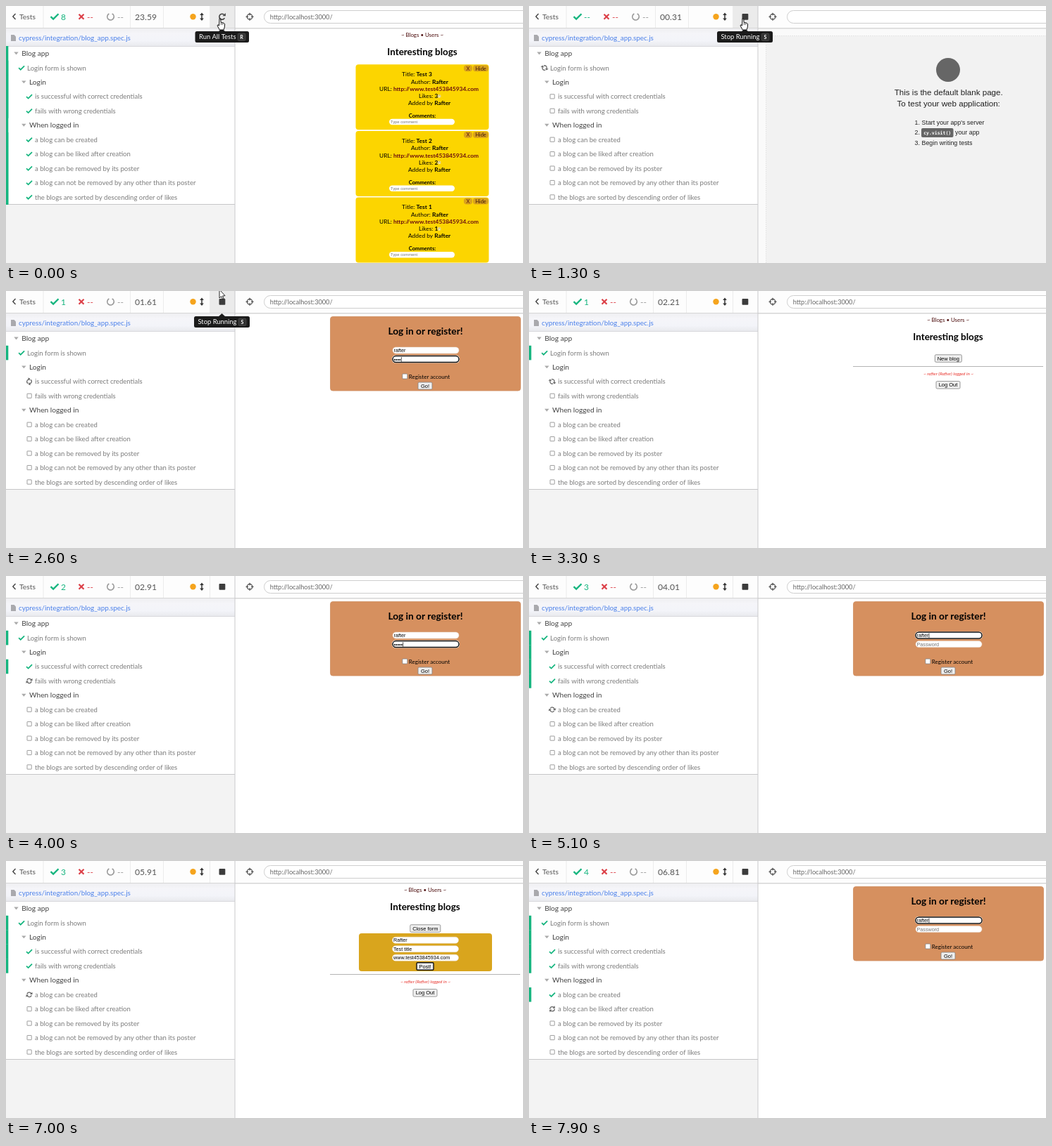
An HTML page with a canvas for the animation above (8000 ms loop, 734 by 366 pixels).

```html
<!DOCTYPE html>
<html lang="en">
<head>
<meta charset="utf-8">
<title>Test runner</title>
<style>
html, body { margin: 0; width: 100%; height: 100%; overflow: hidden; background: #fff; }
canvas { display: block; width: 734px; height: 366px; }
</style>
</head>
<body>
<canvas id="stage" width="734" height="366"></canvas>
<script>
const ctx = document.getElementById('stage').getContext('2d');
const LOOP = 8000, STEP = 100;
const UI = 'Lato, sans-serif', ARIAL = '"Liberation Sans", Arial, sans-serif';
const GREEN = '#16b57f', RED = '#dc4048', GREY = '#7c7c7c';
const USER = 'rafter', AUTHOR = 'Rafter', SITE = 'www.test453845934.com';

const rows = [
  ['Blog app', 0], ['Login form is shown', 1, 0], ['Login', 1],
  ['is successful with correct credentials', 2, 1], ['fails with wrong credentials', 2, 2],
  ['When logged in', 1], ['a blog can be created', 2, 3],
  ['a blog can be liked after creation', 2, 4], ['a blog can be removed by its poster', 2, 5],
  ['a blog can not be removed by any other than its poster', 2, 6],
  ['the blogs are sorted by descending order of likes', 2, 7]
];
const testEnds = [1800, 3400, 4300, 7200];
const rowY = i => 67.6 + 20.45 * i;

// ---- drawing helpers ----
function rect(x, y, w, h, color) {
  ctx.fillStyle = color;
  ctx.fillRect(x, y, w, h);
}
function round(x, y, w, h, r, fill, stroke, lw = 1) {
  ctx.beginPath();
  ctx.roundRect(x, y, w, h, r);
  if (fill) { ctx.fillStyle = fill; ctx.fill(); }
  if (stroke) { ctx.strokeStyle = stroke; ctx.lineWidth = lw; ctx.stroke(); }
}
function path(points, color, lw = 1, fill) {
  ctx.beginPath();
  points.forEach(([x, y]) => ctx.lineTo(x, y));
  if (fill) { ctx.closePath(); ctx.fillStyle = fill; ctx.fill(); }
  if (color) { ctx.strokeStyle = color; ctx.lineWidth = lw; ctx.stroke(); }
}
function disc(x, y, r, color) {
  ctx.beginPath();
  ctx.arc(x, y, r, 0, 7);
  ctx.fillStyle = color;
  ctx.fill();
}
function arc(x, y, r, from, to, color, lw) {
  ctx.beginPath();
  ctx.arc(x, y, r, from, to);
  ctx.strokeStyle = color;
  ctx.lineWidth = lw;
  ctx.stroke();
}
// y is the middle of the line; returns the x after the text
function text(s, x, y, size, color = '#000', { font = UI, style = '', align = 'left' } = {}) {
  ctx.font = `${style} ${size}px ${font}`;
  ctx.textAlign = align;
  ctx.fillStyle = color;
  ctx.fillText(s, x, y + size * 0.35);
  return x + ctx.measureText(s).width;
}
const center = (s, x, y, size, color, opt) => text(s, x, y, size, color, { ...opt, align: 'center' });

function check(x, y, s) {
  path([[x - 5 * s, y + .2 * s], [x - 1.7 * s, y + 3.3 * s], [x + 5 * s, y - 3.4 * s]], GREEN, 2.2 * s);
}
function spinner(x, y, t) {
  ctx.save();
  ctx.translate(x, y);
  ctx.rotate(t / 2000 * Math.PI * 2);
  for (let i = 0; i < 2; i++) {
    arc(0, 0, 3.2, .25, 2.75, '#666', 1.3);
    path([[-4.5, .2], [-.9, .2], [-4.5, 3.6]], null, 1, '#666');
    ctx.rotate(Math.PI);
  }
  ctx.restore();
}
function button(s, x, y, w, h, focus) {
  round(x - w / 2, y - h / 2, w, h, 1.5, '#efefef', focus ? '#111' : '#808080', focus ? 1.4 : .8);
  center(s, x, y, 7.5, '#000', { font: ARIAL });
}
function field(x, y, w, value, hint, focus) {
  if (focus) round(x - 1, y - 1, w + 2, 11, 5, '#fff');
  round(x, y, w, 9, 4.5, '#fff', focus ? '#111' : '#e4d9cd', focus ? 1.5 : .5);
  const end = text(value || hint, x + 1.5, y + 4.6, 7.2, value ? '#000' : '#757575', { font: ARIAL });
  if (focus) rect(value ? end + .3 : x + 1.5, y + 1.5, .7, 6.5, '#000');
}

// ---- pages under test ----
function blogCard(n, y) {
  round(496.5, y, 189, 93, 4, '#fcd500');
  round(650, y + 1, 12, 9, 4, '#d9a21c');
  round(663, y + 1, 22, 9, 4, '#d9a21c');
  center('X', 656, y + 5.7, 7.5, '#5b1a10');
  center('Hide', 674, y + 5.7, 7.5, '#3c160c');
  const line = (label, value, x, dy, color) =>
    text(value, text(label + ' ', x, y + dy, 8.4), y + dy, 8.4, color, { style: 'bold' });
  line('Title:', 'Test ' + n, 562, 14);
  line('Author:', AUTHOR, 575, 24.3);
  line('URL:', 'http://' + SITE, 530, 34.8, '#6b0f0f');
  line('Likes:', n, 586, 45);
  disc(615, y + 45, 2.4, '#f3e6a4');
  path([[613, y + 47], [615, y + 43], [617, y + 45.5]], '#b9a66a', .7);
  line('Added by', AUTHOR, 571, 55);
  center('Comments:', 591, y + 73, 7.6, '#000', { style: 'bold' });
  round(544, y + 77.5, 93, 8.5, 4.2, '#fff');
  text('Type comment', 546, y + 81.8, 5.8, '#777', { font: ARIAL });
}
function pageHead(x) {
  center('~ Blogs • Users ~', x, 41.3, 7.9, '#4a0a0a');
  center('Interesting blogs', x, 65.3, 13.4, '#000', { style: 'bold' });
}
function blogsPage() {
  pageHead(591);
  [3, 2, 1].forEach((n, i) => blogCard(n, 83.3 + 94.6 * i));
}
function blankPage() {
  rect(326, 33, 408, 333, '#fafafa');
  rect(337, 43, 397, 323, '#f2f2f2');
  ctx.setLineDash([2, 1]);
  path([[336.5, 366], [336.5, 42.5], [734, 42.5]], '#e4e4e4');
  ctx.setLineDash([]);
  disc(595, 91, 17, '#666');
  const opt = { font: ARIAL };
  center('This is the default blank page.', 595.7, 123.3, 11.6, '#222', opt);
  center('To test your web application:', 595.7, 139.3, 11.6, '#222', opt);
  ['1.', '2.', '3.'].forEach((s, i) => text(s, 547.5, 165.5 + 14.6 * i, 8.8, '#222', opt));
  text("Start your app's server", 557.5, 165.5, 8.9, '#222', opt);
  round(557, 174, 45.5, 13, 2, '#666');
  center('cy.visit()', 579.7, 180.5, 6.5, '#fff', { font: '"DejaVu Sans Mono", monospace', style: 'bold' });
  text('your app', 605, 180.3, 8.9, '#222', opt);
  text('Begin writing tests', 557.5, 194.8, 8.9, '#222', opt);
}
function loginPage(user = '', dots = 0, focus = user ? 0 : -1) {
  round(460.5, 36.5, 270, 105.5, 3.5, '#d6905f', '#cf8d60', .8);
  center('Log in or register!', 595.5, 57, 13.7, '#000', { style: 'bold' });
  field(549, 80, 94, user, 'Username', focus === 0);
  field(549, 92.6, 94, '•'.repeat(dots), 'Password', focus === 1);
  round(562.8, 118, 7, 7, 1, '#fff', '#808080', .8);
  text('Register account', 571.8, 122.3, 8);
  button('Go!', 595, 135, 20, 10);
}
function homePage(t, open) {
  pageHead(595);
  button(open ? 'Close form' : 'New blog', 595.3, 96, open ? 43 : 38, 10.5);
  const dy = open ? 0 : -54;
  if (open) {
    round(501, 103, 189, 54, 4, '#d9a51d');
    let left = Math.max(0, Math.floor((t - 6300) / 17)), focus = -1;
    [[AUTHOR, 'Author'], ['Test title', 'Title'], [SITE, 'URL']].forEach(([value, hint], i) => {
      const shown = value.slice(0, left);
      if (left > 0 && left <= value.length) focus = i;
      field(548.5, 108.2 + 12.5 * i, 94, shown, hint, focus === i);
      left = Math.max(0, left - value.length);
    });
    button('Post!', 595, 150, 24, 10.5, t >= 7000);
  }
  rect(460, 161 + dy, 270, 1, '#b4b4b4');
  center(`~ ${USER} (${AUTHOR}) logged in ~`, 595.5, 171.3 + dy, 6.4, '#e8322b', { style: 'italic' });
  button('Log Out', 595, 187.8 + dy, 34, 10.5);
}

const empty = () => {}, fresh = () => loginPage(), named = () => loginPage(USER);
const secret = n => () => loginPage(USER, n, 1);
const home = t => homePage(t, false), form = t => homePage(t, true);
const scenes = [
  [0, blogsPage], [500, blankPage], [1500, fresh], [1900, empty], [2100, fresh],
  [2500, named], [2600, secret(4)], [2700, secret(6)], [2900, home], [3400, empty],
  [3600, fresh], [3900, named], [4000, secret(5)], [4100, secret(6)], [4400, empty],
  [4700, fresh], [5100, named], [5200, secret(4)], [5300, secret(6)], [5500, home],
  [6000, form], [7100, home], [7300, empty], [7600, fresh], [7900, named]
];

// ---- runner ----
function clock(t) {
  if (t < 500) return '23.59';
  if (t < 1000) return '--';
  return ((t - (t < 3300 ? 990 : 1090)) / 1000).toFixed(2).padStart(5, '0');
}
function header(t, done, hover) {
  rect(0, 0, 734, 32, '#fdfdfd');
  if (hover) rect(289, 0, 36, 31, '#ebebeb');
  // "--" is wider than a digit and pushes the later stats along
  const push = done ? 0 : 3;
  [52.5, 176 + push, 223 + push, 289].forEach(x => rect(x, 0, 1, 31, '#ececec'));
  path([[13.5, 11], [9.8, 15], [13.5, 19]], '#444', 1.4);
  text('Tests', 19, 15.3, 10.3, '#555');
  check(69, 15, 1.1);
  text(done || '--', 78, 15.5, 12, GREEN);
  ctx.save();
  ctx.translate(push, 0);
  path([[103.5, 11.8], [110.5, 18.8]], RED, 2.2);
  path([[110.5, 11.8], [103.5, 18.8]], RED, 2.2);
  text('--', 115, 15.5, 12, RED);
  arc(148.5, 15.3, 4.7, -1.1, 4.24, '#9a9a9a', 1.7);
  text('--', 158, 15.5, 12, '#999');
  text(clock(t), 183, 15.5, 12.1, '#555');
  ctx.restore();
  disc(265.5, 15.2, 4.2, '#f5a41d');
  path([[278, 12], [278, 19]], '#333', 1.5);
  path([[275.2, 13], [278, 9.5], [280.8, 13]], null, 1, '#333');
  path([[275.2, 17.5], [278, 21], [280.8, 17.5]], null, 1, '#333');
  if (t < 500) {
    arc(306.8, 15.3, 4, .5, 5.4, '#444', 1.6);
    path([[307.5, 14.3], [311.8, 14.3], [311.8, 10]], null, 1, '#444');
  } else round(302.5, 11, 8.8, 8.8, 1, '#3c3c3c');

  arc(346, 15.3, 3.8, 0, 7, '#555', 1.3);
  for (const [dx, dy] of [[1, 0], [-1, 0], [0, 1], [0, -1]])
    path([[346 + 2 * dx, 15.3 + 2 * dy], [346 + 5.5 * dx, 15.3 + 5.5 * dy]], '#555', 1.3);
  round(366.5, 6.5, 390, 18, 9, '#fff', '#cfcfcf');
  if (t < 500 || t >= 1500) text('http://localhost:3000/', 374.7, 15.6, 9.2, '#666');
  rect(0, 31, 734, 1, '#d6d6d6');
  rect(325, 32, 409, 1, '#e9e9e9');
}
function specList(t, done, running) {
  rect(0, 32, 325, 334, '#f3f3f3');
  const fade = ctx.createLinearGradient(0, 32, 0, 57);
  fade.addColorStop(0, '#efeff2');
  fade.addColorStop(.3, '#f5f5f9');
  fade.addColorStop(.7, '#f3f4f9');
  fade.addColorStop(1, '#e9eaee');
  rect(0, 32, 325, 25, fade);
  path([[7, 41], [11.5, 41], [14, 43.5], [14, 50], [7, 50]], null, 1, '#a9a9ad');
  text('cypress/integration/blog_app.spec.js', 18, 45.4, 9.9, '#4b80ea');
  rect(0, 57, 325, 226, '#fff');
  rect(0, 57, 325, 1, '#d8d8dc');
  rect(0, 282, 325, 1, '#c6c6c8');

  const bar = (y, h) => rect(0, y, 3.3, h, GREEN);
  if (done === 8) bar(57, 226);
  rows.forEach(([label, depth, test], i) => {
    const y = rowY(i);
    if (test === undefined) {
      const x = 14.5 + 10.8 * depth;
      path([[x - 3.2, y - 2], [x + 3.2, y - 2], [x, y + 1.8]], null, 1, '#aaa');
      text(label, x + 7.7, y, 10.2, '#444');
      if (i === 2 && done >= 3) bar(y - 10.3, 20.6);
      return;
    }
    const x = 11.2 + 10.9 * depth;
    if (test < done) {
      check(x, y, .8);
      bar(y - 10.3, 20.6);
    } else if (test === running) spinner(x, y, t);
    else round(x - 3, y - 3.2, 6.2, 6.2, .3, '#fff', '#939393', .9);
    text(label, x + 8, y + .2, 9.55, GREY);
  });
  rect(324.5, 0, 1, 366, '#c9c9cb');
}
function tooltip(label, key, x, w) {
  path([[301.5, 36.5], [306.5, 32], [311.5, 36.5]], null, 1, '#1b1b1b');
  round(x, 36, w, 16, 2.5, '#1b1b1b');
  text(label, x + 5.5, 43.9, 9.4, '#fff');
  const kx = x + w - 16;
  round(kx, 39, 11, 10.5, 2, '#333', '#4a4a4a', .8);
  center(key, kx + 5.5, 44.3, 7, '#fff', { style: 'bold' });
}
function pointer(t) {
  if (t < 2400) {
    path([[303, 18], [304.7, 18], [305.2, 23.5], [308.6, 24], [310.6, 25.5], [310.3, 30], [309, 34],
      [303.3, 34], [300, 28], [300.8, 26.7], [302.5, 28]], '#111', 1, '#fff');
    path([[305.4, 24], [305.4, 27]], '#111', .7);
    path([[307.8, 24], [307.8, 27]], '#111', .7);
  } else {
    const y = -2 + (2600 - t) / 100 * 8;
    path([[303, 0], [303, 12], [305.7, 9.6], [307.6, 13.8], [309.3, 13], [307.5, 9], [311, 8.7]]
      .map(([px, py]) => [px, py + y]), '#111', .9, '#fff');
  }
}

function draw(t) {
  const passed = testEnds.filter(end => t >= end).length;
  const done = t < 500 ? 8 : passed;
  const running = t < 1000 ? -1 : passed;
  const hover = t < 2700;
  rect(0, 0, 734, 366, '#fff');
  scenes.filter(([start]) => t >= start).pop()[1](t);
  header(t, done, hover);
  specList(t, done, running);
  if (!hover) return;
  if (t < 500) tooltip('Run All Tests', 'R', 268.5, 76.5);
  else tooltip('Stop Running', 'S', 267, 79);
  pointer(t);
}

const began = performance.now();
function tick() {
  const t = (performance.now() - began) % LOOP;
  draw(Math.floor(t / STEP) * STEP);
  requestAnimationFrame(tick);
}
tick();
</script>
</body>
</html>
```
